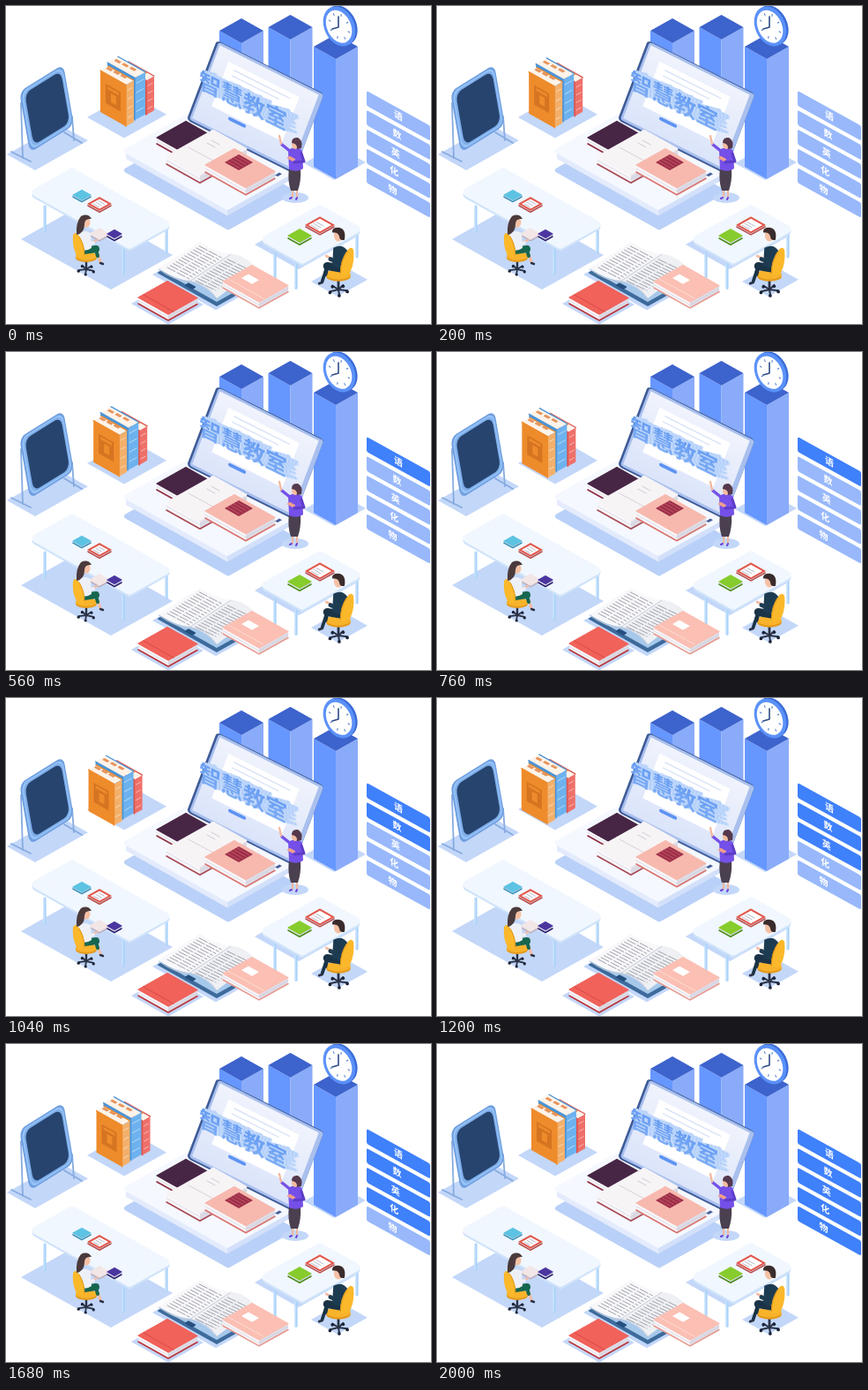
Animation, 482 px wide and 360 px high, one loop 2440 ms. Source, as an HTML page:

```html
<!DOCTYPE html>
<html lang="zh">
<head>
<meta charset="utf-8">
<style>
html, body { margin: 0; width: 100%; height: 100%; overflow: hidden; background: #fff; }
svg { display: block; width: 482px; height: 360px; }
text { font-family: "Noto Sans CJK SC", "Noto Sans CJK", sans-serif; font-weight: 900; }
</style>
</head>
<body>
<svg id="stage" viewBox="0 0 482 360"></svg>
<script>
const SLOPE = .56;
const SHADE = '#c3d7f9', PALE = '#98b8fb', BRIGHT = '#3f80fb';

const line = (color, w, d, more = '') =>
  `<path d="${d}" fill="none" stroke="${color}" stroke-width="${w}" stroke-linecap="round" stroke-linejoin="round" ${more}/>`;
const area = (fill, d) => `<path d="${d}" fill="${fill}"/>`;
const oval = (fill, x, y, rx, ry = rx) => `<ellipse cx="${x}" cy="${y}" rx="${rx}" ry="${ry}" fill="${fill}"/>`;
const rect = (fill, x, y, w, h, r = 0) => `<rect x="${x}" y="${y}" width="${w}" height="${h}" rx="${r}" fill="${fill}"/>`;
const place = (transform, body) => `<g transform="${transform}">${body}</g>`;
const loop = (n, f) => Array.from({ length: n }, (_, i) => f(i)).join('');

// Floor parallelogram from its left corner: a runs down-right, b up-right.
function quad(fill, x, y, a, b, round = 0) {
  const p = [[0, 0], [b, -b], [a + b, a - b], [a, a]].map(([u, v]) => [x + u, y + v * SLOPE]);
  return `<polygon points="${p.join(' ')}" fill="${fill}" stroke="${round ? fill : 'none'}" stroke-width="${round}" stroke-linejoin="round"/>`;
}

// Upright face from its top-left corner.
const wall = (fill, x, y, w, h, slope = SLOPE) => area(fill, `M${x} ${y}l${w} ${w * slope}v${h}l${-w} ${-w * slope}z`);

const box = (x, y, a, b, h, top, left, right, round = 0) =>
  wall(left, x, y, a, h) + wall(right, x + a, y + a * SLOPE, b, h, -SLOPE) + quad(top, x, y, a, b, round);

const book = (x, y, a, b, h, cover, edge) =>
  quad(edge, x, y + h, a, b, 1.5) + box(x, y, a, b, h - 1, cover, '#f8f6f9', '#dedce6', 1.2) +
  line('#c9cbd8', .6, `M${x} ${y + h / 2}l${a} ${a * SLOPE}l${b} ${-b * SLOPE}`);

const column = (x, y, h) => box(x, y, 25, 25, h, '#3d63cc', '#6697ff', '#8aabf9');

function clock() {
  const ticks = loop(8, i => line('#6085c9', 1.4, 'M0 -17v2', `transform="rotate(${i * 45}) translate(0 2)"`));
  return place('translate(378 23) rotate(-25)',
    oval('#3a6cd8', 2.5, 0, 17, 23.5) + oval('#5b91f8', 0, 0, 17, 23.5) + oval('#fff', -.5, 0, 13.5, 19.5) +
    place('scale(.72 1.05)', ticks)) + line('#2c4a86', 1.6, 'M377 12v12l-7 2');
}

function blackboard() {
  const frame = ['#6f9fe0', '#96c2f6', '#7eaeea', '#27446f'];
  return quad(SHADE, 1, 168, 32, 60) +
    line('#86abe0', 1.8, 'M17 110l2 62M6 165l22 11M75 125l2 27M66 143l20 12') +
    place('matrix(.5 -.31 .12 .69 15 97)',
      frame.map((c, i) => rect(c, i * 3.5, i * 2.5, 100 - i * 6, 100 - i * 5, 13)).join(''));
}

function standingBook(x, y, a, b, h, front, side) {
  const tabs = loop(3, i => quad('#e8935a', x + b * .4 + (i + .4) * a / 3.6, y - 4 + (i + .4) * a * .14, 5, 2, 1));
  return box(x, y, a, b, h, '#fdf3e9', front, side) +
    line(front, 1.3, `M${x} ${y}l${a} ${a * SLOPE}v${h}M${x + b} ${y - b * SLOPE}l${a} ${a * SLOPE}`) +
    loop(4, i => line('#fff', 1, `M${x + a + 2} ${y + a * SLOPE + 6 + i * h / 4.5}l${b - 4} ${(4 - b) * SLOPE}`, 'opacity=".5"')) + tabs;
}

const standingBooks = () => '<g id="books">' +
  standingBook(130, 68, 29, 9, 39, '#d95550', '#ee7069') +
  standingBook(115, 64, 31, 12, 48, '#4a93d6', '#6db2ee') +
  standingBook(107, 73, 29, 9, 47, '#ee8b2b', '#f3b06a') +
  wall('#d57421', 113, 88, 17, 22) + wall('#ee8b2b', 115, 91, 13, 3) + wall('#ee8b2b', 119, 99, 6, 10) + '</g>';

function title() {
  const word = (x, y, fill) => `<text transform="matrix(1 .49 -.08 1 ${x} ${y})" font-size="25" fill="${fill}">智慧教室</text>`;
  return loop(7, i => word(232 - i * 2, 95 - i * .5, i % 2 ? '#b3cffa' : '#c3dafc')) + word(218, 92, 'url(#ink)');
}

function laptop() {
  const screen = rect('#3f5c98', -1, -1, 103, 104, 4) + rect('#a9c0ee', 1, 0, 101, 101, 3) +
    rect('url(#glass)', 3, 3, 95, 95) + rect('#fff', 15, 16, 68, 58) +
    loop(3, i => rect('#d9e3f8', 22, 22 + i * 7, 54 - i * 9, 1.5)) + rect('#5d93f2', 32, 76, 17, 4, 2);
  return quad('#b9d0f8', 137, 186, 115, 72, 6) +
    box(136, 164, 115, 72, 9, '#f5f8ff', '#e3ebfc', '#d3e0fa', 5) +
    loop(5, i => quad('#4a5f9a', 273 + i * 8, 209 - i * 4.4, 3, 5)) +
    place('matrix(1.18 .59 -.33 .87 240 40)', screen) + title() +
    book(171, 149, 34, 33, 7, '#472545', '#8f2c40') +
    book(182, 170, 38, 53, 9, '#f7f4f6', '#a84a55') +
    line('#d8d0d8', 1, 'M207 160l37 20') + line('#c5bfcb', .8, 'M228 155l9 5m-4 -8l9 5') +
    book(226, 180, 46, 33, 8, '#f7b9ae', '#d9736f') + quad('#9e2f48', 248, 177, 16, 16) +
    loop(4, i => line('#d4707c', .6, `M${251 + i * 3.5} ${175.5 - i * 2}l14 8`));
}

const presenter = () => oval(SHADE, 328, 217, 15, 6) +
  line('#f0b8a0', 2.2, 'M325 206v10m5 -10v10') + line('#6b45d8', 2, 'M324 217l-2 1m8 -1l-1 2') +
  area('#4a4050', 'M321 184h13q1 14 -3 25h-8q-4 -12 -2 -25z') +
  line('#7550e8', 3.5, 'M323 165l-10 -8') + line('#f2b89f', 2.3, 'M312 156l-2 -9') +
  area('#7550e8', 'M320 163q9 -6 16 1l1 20q-7 5 -16 1z') +
  line('#5d3dc8', 3, 'M335 167l3 9l-11 1') + quad('#f1a08c', 319, 172, 6, 3, 1) +
  oval('#f3bd9f', 328, 157, 4, 5) + area('#56394c', 'M324 155q0 -7 7 -6q6 3 4 12l-5 1q1 -6 -6 -7z');

function desk(x, y, a, b, drop) {
  const feet = [[x + 14, y + 16], [x + a - 7, y + a * SLOPE + 2], [x + a + b - 3, y + (a - b) * SLOPE + 3]];
  return feet.map(([u, v]) => line('#a9d2fa', 3.2, `M${u} ${v}v${drop}`) + line('#d9ecfe', 1, `M${u - 1} ${v}v${drop}`)).join('') +
    quad('#cfe3fa', x + 4, y + 2.5, a - 4, b - 4, 9) + quad('#f1f7fe', x + 4, y, a - 4, b - 4, 9);
}

const clipboard = (x, y, a, b) => book(x, y, a, b, 2, '#e2584c', '#b8423f') + quad('#fff', x + 3, y, a - 3, b - 3) +
  loop(3, i => line('#a3a6ba', .8, `M${x + 6 + i * 3} ${y - i * 1.7}l${a * .5} ${a * .28}`));

// Seated figure facing right, with the chair's foot at the origin.
function seated(transform, { coat, lap, shin, hair, longHair }) {
  return place(transform,
    loop(5, i => {
      const t = i * 1.257 + .4, x = 9 * Math.cos(t), y = 5 * Math.sin(t);
      return line('#2b3346', 1.8, `M0 0L${x} ${y}`) + oval('#1c2438', x, y + 1, 1.6);
    }) +
    line('#2b3346', 2.4, 'M0 0v-12') + oval('#e59a1c', 0, -13, 12, 5) + oval('#f8b32c', 0, -15, 12, 5) +
    line(shin, 3.2, 'M12 -20l4 12') + line(lap, 8, 'M-2 -21l13 -2') + line(lap, 4, 'M11 -22l2 7') +
    line('#2b3346', 2.4, 'M16 -7l3 1') +
    area(coat, 'M-9 -38q5 -8 14 -3l1 17q-7 5 -15 1z') +
    line('#f2bca4', 2.4, 'M4 -29l8 -4') + line(coat, 4, 'M1 -37l2 9l5 -2') +
    area('#fbb82a', 'M-15 -38q1 -5 5 -2q9 11 8 25q-5 4 -10 -3q-4 -9 -3 -20z') +
    line('#dd951c', 1, 'M-8 -37q6 10 6 21') +
    oval('#f4c1a5', 0, -53, 4.5, 5.5) +
    area(hair, longHair ? 'M-11 -39q-1 -14 5 -21q8 -4 12 3q-8 -1 -8 6q0 10 -9 12z' : 'M-6 -49q-2 -11 6 -12q7 0 6 5q-6 -1 -7 4q0 4 -5 3z'));
}

function openBook() {
  const rows = loop(12, i => {
    const x = 183 + i * 3.3, y = 296 - i * 2.2;
    return `M${x} ${y}l25 13M${x + 32} ${y + 15}l23 11`;
  });
  return quad(SHADE, 166, 304, 72, 50) + quad('#3d6b9c', 173, 302, 66, 47, 2) + quad('#a6c8ea', 173, 298, 66, 47) +
    area('#f8f8fa', 'M173 297L220 267Q236 278 255 281L209 311Q192 310 173 297Z') +
    area('#eff0f4', 'M209 311L255 281Q270 281 284 297L239 331Q227 316 209 311Z') +
    line('#c6cad6', .9, 'M173 298Q192 312 209 312T239 331M209 311l46 -30') +
    line('#a0a2ac', 1, rows, 'stroke-dasharray="10 2.5"') + quad('#25507f', 204, 316, 7, 3, 2);
}

const floorBooks = () => quad(SHADE, 142, 337, 42, 40) + openBook() +
  book(150, 330, 34, 33, 7, '#f0625a', '#b9353b') + line('#d94a48', 1, 'M156 327l34 19') +
  book(246, 312, 41, 33, 7, '#fbbfb3', '#e79a90') + line('#fddcd4', 1, 'M252 309l40 22') + quad('#fff', 267, 308, 12, 8);

const panels = () => [...'语数英化物'].map((label, i) => place(`matrix(1 .55 0 1 409 ${96 + i * 21.8})`,
  `<g class="panel">${rect('inherit', 0, 0, 72, 17, 2).replace('fill="inherit"', '')}</g>` +
  `<text x="${36 - i * 1.6}" y="12" font-size="10" text-anchor="middle" fill="#fff">${label}</text>`)).join('');

const gradient = (id, from, to) =>
  `<linearGradient id="${id}" x2="0" y2="1"><stop stop-color="${from}"/><stop offset="1" stop-color="${to}"/></linearGradient>`;

document.getElementById('stage').innerHTML = [
  `<defs>${gradient('glass', '#f0f3fc', '#dbe4fa')}${gradient('ink', '#5f97f1', '#83b0f6')}</defs>`,
  quad(SHADE, 92, 126, 42, 48), standingBooks(), blackboard(),
  quad(SHADE, 338, 178, 34, 36), column(242, 28, 90), column(297.5, 24, 100), column(349, 46, 136), clock(),
  laptop(), presenter(),
  quad(SHADE, 17, 264, 102, 70), desk(30, 211, 110, 45, 28),
  book(76, 214, 10, 10, 2, '#5cc3e2', '#2f8db8'), clipboard(93, 224, 13, 13),
  book(95, 258, 11, 11, 1.5, '#f3e6e6', '#b9a8b5'), book(115, 258, 8, 8, 3, '#4b36a0', '#2c206d'),
  seated('translate(91 298)', { coat: '#eef0f7', lap: '#17664f', shin: '#f2bca4', hair: '#4b3a3c', longHair: true }),
  quad(SHADE, 282, 270, 50, 65), quad(SHADE, 346, 312, 30, 34), desk(291, 264, 45, 65, 28),
  book(320, 260, 13, 13, 3, '#86cc2c', '#4a8c1c'), clipboard(340, 248, 16, 16),
  seated('translate(377 321) scale(-1.15 1.15)', { coat: '#1d3c52', lap: '#1a3346', shin: '#1a3346', hair: '#3a2c2c' }),
  floorBooks(), panels()
].join('');

const books = document.getElementById('books');
const bands = [...document.querySelectorAll('.panel')];

function draw(now) {
  const t = Math.floor(now % 2440 / 40) * 40;
  const k = Math.max(0, 1 - Math.abs(t - 1000) / 1000);
  books.setAttribute('transform', `translate(${-14 * k} ${8.3 * k})`);
  bands.forEach((band, i) => band.setAttribute('fill', t >= 400 * (i + 1) ? BRIGHT : PALE));
  requestAnimationFrame(draw);
}
draw(0);
</script>
</body>
</html>
```
